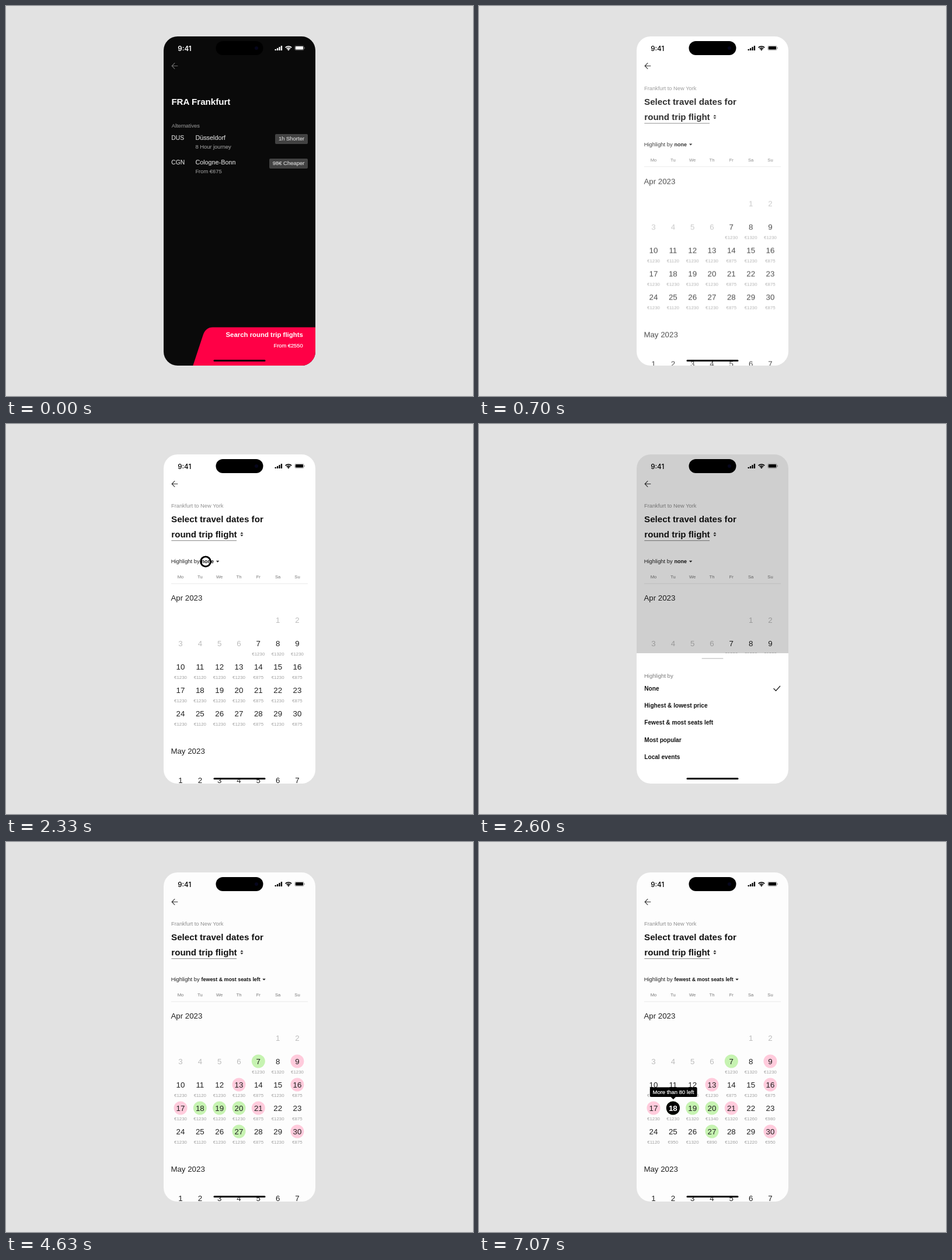
An HTML page that plays this animation: 800 by 667 pixels, repeating every 8000 ms.

```html
<!DOCTYPE html>
<html lang="en">
<head>
<meta charset="utf-8">
<title>Flight date picker</title>
<style>
html, body { margin: 0; width: 100%; height: 100%; overflow: hidden; background: #e2e2e2; }
svg { display: block; width: 100vw; height: 100vh; }
text { font-family: "Liberation Sans", Arial, sans-serif; }
.b { font-weight: 700; }
.clock { font-family: Inter, sans-serif; }
</style>
</head>
<body>
<svg id="stage" viewBox="0 0 800 667"></svg>
<script>
const LOOP = 8000;
const PINK = '#ffcbdc', GREEN = '#c6f3b1';

const text = (x, y, size, fill, str, extra = '') =>
  `<text x="${x}" y="${y}" font-size="${size}" fill="${fill}" ${extra}>${str}</text>`;
const bold = (x, y, size, fill, str, extra = '') => text(x, y, size, fill, str, `class="b" ${extra}`);
const medium = (x, y, size, fill, str, extra = '') =>
  text(x, y, size, fill, str, `stroke="${fill}" stroke-width=".2" ${extra}`);
const mid = 'text-anchor="middle"', end = 'text-anchor="end"';
const rect = (x, y, w, h, fill, extra = '') =>
  `<rect x="${x}" y="${y}" width="${w}" height="${h}" fill="${fill}" ${extra}/>`;
const line = (d, stroke, width) => `<path d="${d}" fill="none" stroke="${stroke}" stroke-width="${width}"/>`;

function statusBar(color, weight) {
  const bars = [2.3, 4, 6, 8].map((h, i) => rect(460.6 + i * 3.4, 76 - h, 2.3, h, color, 'rx=".6"')).join('');
  return text(294.3, 76.8, 11.6, color, '9:41', `class="clock" font-weight="${weight}"`) + bars +
    line('M478.6 71.2A7.7 7.7 0 0 1 489.2 71.2M480.7 73.2A4.8 4.8 0 0 1 487.1 73.2', color, 1.7) +
    `<path d="M483.9 76.4L481.9 74.3A2.8 2.8 0 0 1 485.9 74.3Z" fill="${color}"/>` +
    rect(494.6, 67.9, 15.8, 7.8, 'none', `rx="2.4" stroke="${color}" stroke-opacity=".4" stroke-width=".7"`) +
    rect(495.8, 69, 13.4, 5.6, color, 'rx="1.4"') +
    rect(511, 70.6, .9, 2.5, color, 'rx=".5" opacity=".45"');
}

const arrow = color => line('M294.3 102.5H284.2M289.2 97.4L284.1 102.5L289.2 107.6', color, 1.1);

function airport(y, code, city, note, badge, left) {
  return medium(283.3, y, 10.3, '#d2d2d2', code) + medium(324.4, y, 10.8, '#d2d2d2', city) +
    medium(324.4, y + 14.8, 9.35, '#8c8c8c', note) +
    rect(left, y - 10, 517 - left, 17, '#424242', 'rx="2"') +
    medium((left + 517) / 2, y + 1.4, 9.45, '#d0d0d0', badge, mid);
}

// Calendar
const colX = i => 299 + i * 33.33;
const day = (x, y, n, fill, extra = '') => text(x, y + 4.7, 13.3, fill, n, `${mid} ${extra}`);
const week = [1230, 1120, 1230, 1230, 875, 1230, 875];
const before = [1230, 1320, 1230, ...week, 1230, 1230, 1230, 1230, 875, 1230, 875, ...week];
const after = [...before.slice(0, 10), 1230, 1230, 1320, 1340, 1320, 1260, 980, 1120, 950, 1320, 890, 1260, 1220, 950];
const marks = { [GREEN]: [7, 18, 19, 20, 27], [PINK]: [9, 13, 16, 17, 21, 30] };
const cell = n => [colX((n + 4) % 7), 335 + 40 * Math.floor((n + 4) / 7)];

const dayNumbers = Array.from({ length: 30 }, (_, i) =>
  day(...cell(i + 1), i + 1, i < 6 ? '#bcbcbc' : '#202020')).join('') +
  Array.from({ length: 7 }, (_, i) => day(colX(i), 609.5, i + 1, '#202020')).join('');
const priceList = list => list.map((p, i) => {
  const [x, y] = cell(i + 7);
  return text(x, y + 20.7, 7.9, '#a2a2a2', '€' + p, mid);
}).join('');
const dots = Object.entries(marks).map(([color, days]) => days.map(n => {
  const [x, y] = cell(n);
  return `<circle cx="${x}" cy="${y}" r="11.5" fill="${color}"/>`;
}).join('')).join('');
const weekdays = ['Mo', 'Tu', 'We', 'Th', 'Fr', 'Sa', 'Su']
  .map((d, i) => text(colX(i), 264.2, 7.7, '#777', d, mid)).join('');

const caret = x => `<path d="M${x} 233.8h5.4l-2.7 2.9z" fill="#222"/>`;
const options = ['None', 'Highest &amp; lowest price', 'Fewest &amp; most seats left', 'Most popular', 'Local events']
  .map((s, i) => bold(283.3, 455.6 + i * 29.35, 10.1, '#111', s)).join('');

document.getElementById('stage').innerHTML = `
<defs>
  <clipPath id="phone"><rect x="270" y="52" width="260" height="563" rx="24"/></clipPath>
  <clipPath id="wipe"><rect id="wipeBox" y="52" width="260" height="563"/></clipPath>
  <clipPath id="rest"><rect id="restBox" x="270" y="52" height="563"/></clipPath>
</defs>
${rect(0, 0, 800, 667, '#e2e2e2')}
<g clip-path="url(#phone)">
  <g id="dark" clip-path="url(#rest)">
    ${rect(270, 52, 260, 563, '#0a0a0a', 'id="darkBg"')}
    ${statusBar('#fff', 600)}${arrow('#6c6c6c')}
    <g id="list">
      ${bold(283.4, 168.6, 15.1, '#fff', 'FRA Frankfurt')}
      ${medium(283.8, 207.8, 9.2, '#808080', 'Alternatives')}
      ${airport(229, 'DUS', 'Düsseldorf', '8 Hour journey', '1h Shorter', 461)}
      ${airport(271, 'CGN', 'Cologne-Bonn', 'From €675', '98€ Cheaper', 451)}
    </g>
    <g id="buy">
      <path d="M320 616L337.5 563C340.5 554 346 549.5 354 549.5H531V616Z" fill="#ff0046"/>
      ${bold(508.8, 566.4, 11.4, '#fff', 'Search round trip flights', end)}
      ${medium(508.6, 583.8, 9.3, '#fff', 'From €2550', end)}
    </g>
  </g>
  <g id="light" clip-path="url(#wipe)">
    ${rect(270, 52, 260, 563, '#fff', 'id="lightBg"')}
    ${statusBar('#000', 500)}
    ${arrow('#333')}
    <g id="head">
      ${text(283, 143.3, 9.3, '#8e8e8e', 'Frankfurt to New York')}
      ${bold(283, 168.4, 15.2, '#111', 'Select travel dates for')}
      ${bold(283.3, 193.9, 15.1, '#111', 'round trip flight')}
      ${rect(283.3, 199, 111.7, 1, '#8a8a8a')}
      <path d="M401.4 187.7h5l-2.5 -2.7zM401.4 189.5h5l-2.5 2.7z" fill="#222"/>
    </g>
    <g id="filter">
      ${text(282.8, 238.3, 9.35, '#222', 'Highlight by')}
      <g id="pickNone">${bold(334.6, 238.3, 8.95, '#111', 'none')}${caret(359.9)}</g>
      <g id="pickSeats">${bold(334.6, 238.3, 8.9, '#111', 'fewest &amp; most seats left')}${caret(439.3)}</g>
      ${weekdays}${rect(283, 272.5, 234, 1, '#e9e9e9')}
    </g>
    <g id="days">
      ${text(282.4, 302.3, 13.3, '#222', 'Apr 2023')}${text(282.4, 563.8, 13.3, '#222', 'May 2023')}
      <g id="dots">${dots}</g>
      ${dayNumbers}
      <g id="pricesA">${priceList(before)}</g>
      <g id="pricesB">${priceList(after)}</g>
      <g id="chosen"><circle cx="332.4" cy="455" r="11.6"/>${day(332.3, 455, 18, '#fff', 'class="b"')}</g>
    </g>
    <g id="tip">
      ${rect(292.8, 419.5, 80.8, 16.6, '#000', 'rx="2"')}<path d="M328.6 436h8.4l-4.2 4.2z"/>
      ${medium(333, 431, 9.45, '#fff', 'More than 80 left', mid)}
    </g>
  </g>
  ${rect(0, 52, 1, 563, '#b5b5b5', 'id="edge"')}
  ${rect(270, 52, 260, 563, '#000', 'id="dim"')}
  ${rect(359.5, 60, 81, 24, '#000', 'rx="12"')}<circle cx="429" cy="72" r="3" fill="#06061c"/>
  <g id="sheet">
    ${rect(270, 392, 260, 225, '#fff')}${rect(381.5, 400.3, 37, 1.5, '#cbcbcb', 'rx=".7"')}
    ${text(283, 434.3, 9.5, '#7a7a7a', 'Highlight by')}${options}
    ${line('M504.6 452.3L508.6 456.3L516 448', '#222', 1.3)}
  </g>
  <circle id="ring" fill="none" stroke="#000"/>
  ${rect(355.5, 605, 89, 3, '#000', 'rx="1.5"')}
</g>`;

const el = {};
document.querySelectorAll('#stage [id]').forEach(n => el[n.id] = n);
const set = (id, attrs) => { for (const k in attrs) el[id].setAttribute(k, attrs[k]); };
const show = (id, on) => set(id, { opacity: +on });
const span = (t, a, b) => Math.min(1, Math.max(0, (t - a) / (b - a)));
const outQuad = u => 1 - (1 - u) ** 2;
const outCubic = u => 1 - (1 - u) ** 3;
const inOut = u => u < .5 ? 4 * u ** 3 : 1 - 4 * (1 - u) ** 3;

// start, duration, x, y
const taps = [[17, 500, 421, 584], [2100, 490, 342, 235.3], [4270, 350, 342, 510.5], [6570, 500, 332.4, 455]];

function drawRing(t) {
  const tap = taps.find(([s, d]) => t > s && t < s + d);
  show('ring', 0);
  if (!tap) return;
  const [s, d, cx, cy] = tap;
  const r = 40 * ((t - s) / d) ** 2.07;
  set('ring', { cx, cy, r, 'stroke-width': 3.5 - .066 * r, opacity: span(t, s, s + 60) * (1 - span(t, s + d * .92, s + d)) });
}

function enter(id, t, from, to, rise) {
  const u = outQuad(span(t, from, to));
  set(id, { opacity: u, transform: `translate(0 ${rise * (1 - u)})` });
}

function render(t) {
  // page change
  const p = inOut(span(t, 251, 642));
  const x = 530 - 260 * p, k = 1 - .12 * p;
  set('wipeBox', { x });
  set('restBox', { width: x - 270 });
  set('edge', { x: x - .5, opacity: p > 0 && p < 1 ? 1 : 0 });
  set('list', { transform: `translate(400 333) scale(${k}) translate(-400 -333)` });
  set('buy', { transform: `translate(0 ${55 * p})` });
  const shade = Math.round(10 - 8 * span(p, 0, .6));
  set('darkBg', { fill: `rgb(${shade},${shade},${shade})` });
  show('dark', p < 1);
  enter('head', t, 475, 830, 8);
  enter('filter', t, 480, 840, 12);
  enter('days', t, 485, 870, 13);

  // sheet
  const close = inOut(span(t, 4330, 4630));
  const open = outCubic(span(t, 2335, 2600)) * (1 - close);
  set('sheet', { transform: `translate(0 ${224 * (1 - open)})` });
  set('dim', { opacity: .188 * open });
  set('lightBg', { fill: close > .5 ? '#fdfdfd' : '#fff' });
  const seats = t >= 4420;
  show('pickNone', !seats);
  show('pickSeats', seats);
  set('dots', { opacity: span(t, 4420, 4620) });

  // day selection
  const later = t >= 6790;
  show('pricesA', !later);
  show('pricesB', later);
  set('chosen', { opacity: span(t, 6790, 6900) });
  const pop = outCubic(span(t, 6790, 7000));
  set('tip', { opacity: pop, transform: `translate(0 ${5 * (1 - pop)})` });

  drawRing(t);
}

const began = performance.now();
function tick() {
  render((performance.now() - began) % LOOP);
  requestAnimationFrame(tick);
}
tick();
</script>
</body>
</html>
```
